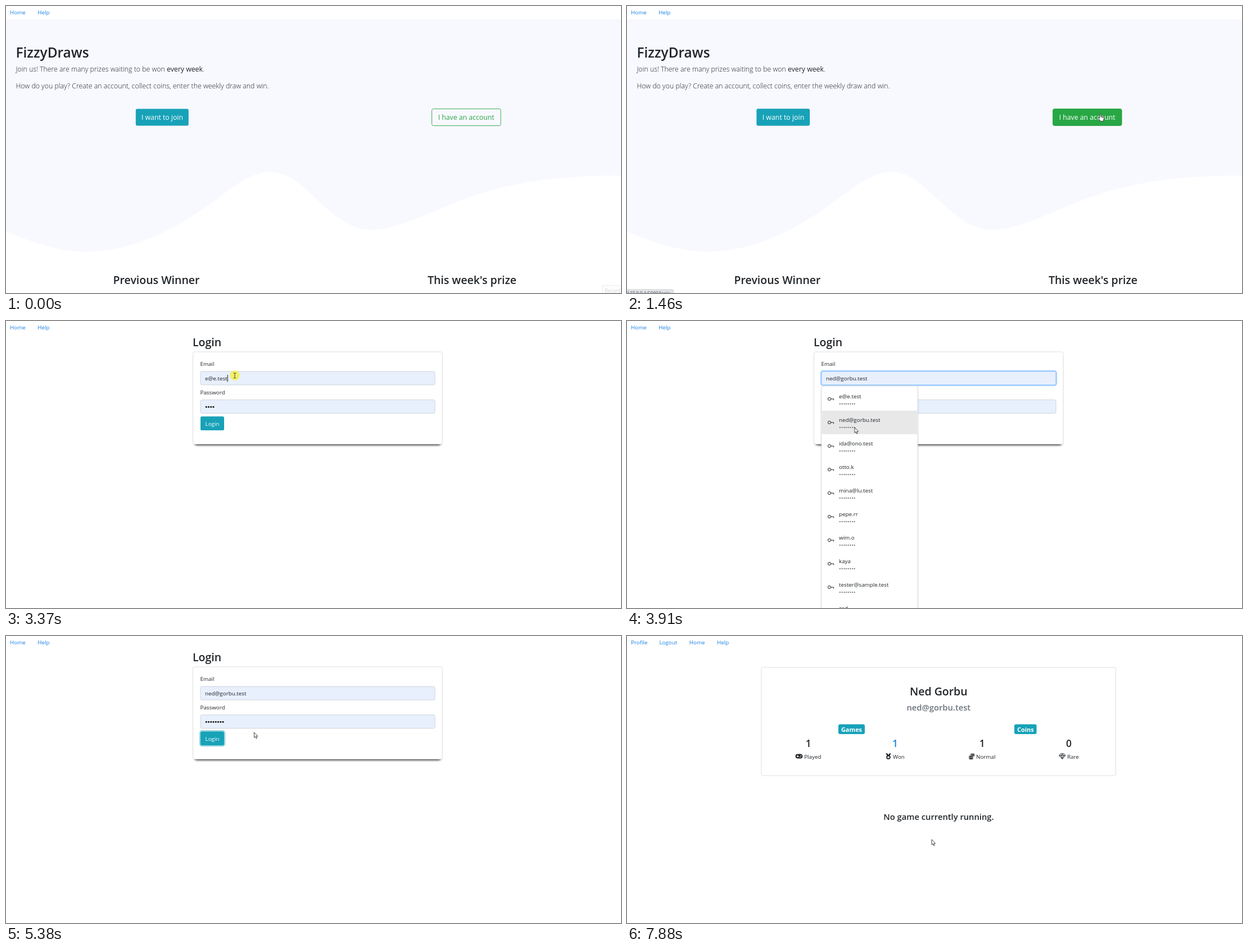
An HTML page for the animation above (8 s loop, 1094 px wide and 512 px high).

```html
<!DOCTYPE html>
<html lang="en">
<head>
<meta charset="utf-8">
<title>Weekly draw</title>
<style>
  html, body { margin: 0; width: 100%; height: 100%; overflow: hidden; background: #fff; }
  svg { display: block; width: 100vw; height: 100vh; }
  text { font-family: "Open Sans", "Noto Sans", sans-serif; font-size: 9.82px; fill: #212529; white-space: pre; }
  .h1 { font-size: 24.4px; font-weight: 600; }
  .h2 { font-size: 19.5px; font-weight: 600; }
  .h3 { font-size: 17.4px; font-weight: 600; }
  .h4 { font-size: 14.75px; font-weight: 600; }
  .lead { font-size: 12.3px; font-weight: 300; }
  .lead tspan { font-weight: 400; }
  .btn { font-size: 12.25px; }
  .badge { font-size: 10.9px; font-weight: 700; }
  .mid { text-anchor: middle; }
  .link { fill: #1a82e2; }
  .white { fill: #fff; }
  .muted { fill: #6c757d; }
  .box { fill: #fff; stroke: #dfdfdf; }
  .icon { fill: #212529; }
  .line { fill: none; stroke: #212529; stroke-width: 1; stroke-linejoin: round; }
</style>
</head>
<body>
<svg id="stage" viewBox="0 0 1094 512" preserveAspectRatio="none"></svg>
<script>
const LOOP = 8000, LOGIN_AT = 2500, PROFILE_AT = 5400;
const NAME = 'Ned Gorbu', EMAIL = 'ned@gorbu.test', OTHER = 'e@e.test';
const svg = document.getElementById('stage');

const text = (x, y, str, cls = '', id = '') =>
  `<text x="${x}" y="${y}" class="${cls}"${id && ` id="${id}"`}>${str}</text>`;
const rect = (x, y, w, h, r, attrs) =>
  `<rect x="${x}" y="${y}" width="${w}" height="${h}" rx="${r}" ${attrs}/>`;
const group = (id, ...parts) => `<g id="${id}">${parts.join('')}</g>`;

const JOIN = { x: 230.8, y: 183.5, w: 94, h: 29.9 };
const joinX = JOIN.x + JOIN.w / 2, joinY = JOIN.y + JOIN.h / 2;

const landing = group('landing',
  `<path fill="#f8f8ff" d="M0 24H1094V303C980 301 890 315 800 350C740 375 690 399 650 399
    C612 399 585 374 555 347C528 322 505 296 470 296C428 296 390 336 340 369
    C280 409 215 438 142 438C95 438 47 422 0 402Z"/>`,
  text(17.5, 92, 'FizzyDraws', 'h1'),
  text(17.5, 117, 'Join us! There are many prizes waiting to be won <tspan>every week</tspan>.', 'lead'),
  text(17.5, 147, 'How do you play? Create an account, collect coins, enter the weekly draw and win.', 'lead'),
  rect(0, 0, 0, 0, 3, 'id="joinShadow"'),
  group('join',
    rect(JOIN.x, JOIN.y, JOIN.w, JOIN.h, 3, 'fill="#17a2b8"'),
    text(joinX + .2, 203.2, 'I want to join', 'btn mid white')),
  rect(756, 182, 125.4, 32.6, 4, 'id="accountRing" fill="none" stroke="#28a745" stroke-width="2.6"'),
  rect(757.5, 183.5, 122.6, 30, 3, 'id="account" fill="#28a745" stroke="#28a745" stroke-width=".9"'),
  text(818.6, 203.2, 'I have an account', 'btn mid', 'accountText'),
  text(267.5, 495.5, 'Previous Winner', 'h2 mid'),
  text(829, 495.5, "This week's prize", 'h2 mid'),
  group('status',
    rect(-4, 505.5, 87, 20, 3, 'fill="#dee1e6" stroke="#cfd2d7" stroke-width=".6"'),
    `<text x="0" y="516" style="font-size:8.2px;fill:#555">127.0.0.1:5000/login</text>`),
  group('record',
    rect(1061, 498.5, 40, 20, 0, 'fill="#fdfdff" stroke="#ececec"'),
    `<text x="1065" y="511" style="font-size:8.6px;fill:#d4d4d4">Record</text>`));

const people = [OTHER, EMAIL, 'ida@ono.test', 'otto.k', 'mina@lu.test', 'pepe.rr', 'wim.o', 'kaya', 'tester@sample.test', 'zed'];
const menuRow = (name, i) => {
  const y = 118 + 42 * i;
  return `<circle cx="360" cy="${y + 21}" r="2.6" class="line"/><path class="line" d="M362.6 ${y + 21}h5v2.4"/>` +
    text(377, y + 20, name) + text(377, y + 33, '••••••••', 'muted');
};
const field = (id, y) =>
  rect(346, y, 417, 24, 2.7, `id="${id}" stroke-width="1"`);

const login = group('login',
  text(332, 45, 'Login', 'h2'),
  rect(336, 64, 437, 157, 3, 'fill="#000" style="filter:blur(2px)"'),
  rect(332.5, 55, 443.6, 164.5, 3, 'class="box"'),
  text(345.5, 80, 'Email'),
  text(345.5, 131, 'Password'),
  rect(344.9, 88.9, 419.2, 26.2, 4, 'id="emailRing" fill="none" stroke="#007bff" stroke-width="2.2"'),
  field('email', 90),
  field('pass', 140.7),
  text(354, 106, '', '', 'emailText'),
  '<path id="caret" stroke="#111" stroke-width="1"/>',
  '<g id="dots"></g>',
  rect(344.8, 169.1, 44.4, 27, 4, 'id="submitRing" fill="none" stroke="#3ab0c3" stroke-opacity=".5" stroke-width="2.2"'),
  rect(346, 170.3, 42, 24.8, 2.7, 'id="submit"'),
  text(367, 187, 'Login', 'mid white'),
  group('menu',
    rect(347, 119, 169, 420, 3, 'fill="#000" fill-opacity=".3" style="filter:blur(2px)"'),
    rect(346, 116, 171, 420, 3, 'class="box"'),
    rect(346.5, 160, 170, 42, 0, 'id="menuHover" fill="#e8e8e9"'),
    people.map(menuRow).join('')));

const stat = (x, value, labelX, label, cls = '') =>
  text(x, 198, value, 'h3 mid ' + cls) + text(labelX, 218.6, label);
const profile = group('profile',
  rect(239, 56, 630.5, 193, 3, 'class="box"'),
  text(554.3, 106, NAME, 'h2 mid'),
  text(554.3, 133.2, EMAIL, 'h4 mid muted'),
  rect(376, 157.5, 47, 17.5, 3, 'fill="#17a2b8"'), text(399.5, 170.6, 'Games', 'badge mid white'),
  rect(689, 157.5, 39.6, 17.5, 3, 'fill="#17a2b8"'), text(708.8, 170.6, 'Coins', 'badge mid white'),
  stat(322.6, 1, 315.2, 'Played'), stat(477, 1, 473, 'Won', 'link'),
  stat(631.6, 1, 621, 'Normal'), stat(786, 0, 783, 'Rare'),
  // gamepad
  rect(299.6, 210.6, 12.8, 8, 4, 'class="icon"'),
  '<path d="M301.6 214.6h4M303.6 212.6v4" stroke="#fff" stroke-width="1.1"/>',
  '<circle cx="308" cy="215.8" r=".9" fill="#fff"/><circle cx="309.7" cy="213.5" r=".9" fill="#fff"/>',
  // medal
  '<path class="icon" d="M460 209.4h3.4l1.6 2.8 1.6-2.8h3.4l-3 4.4h-4z"/>',
  '<circle cx="465" cy="216.3" r="2.8" fill="#fff" stroke="#212529" stroke-width="1.9"/>',
  // coins
  [[614.6, 211], [614.6, 213.2], [612, 214.4], [612, 216.6], [612, 218.8]].map(([x, y]) =>
    `<ellipse cx="${x}" cy="${y}" rx="4" ry="1.5" fill="#212529" stroke="#fff" stroke-width=".5"/>`).join(''),
  // gem
  '<path class="line" d="M771.4 210h5.8l2.6 3.4-5.5 6-5.5-6zM768.8 213.4h11M772.2 213.4l2.1 6 2.1-6-2.1-3.4z"/>',
  text(554.4, 328, 'No game currently running.', 'h4 mid'));

const cursor = group('cursor',
  '<circle id="click" r="8.7" fill="#f4ee4e" fill-opacity=".85"/>',
  `<path id="arrow" fill="#fff" stroke="#333" stroke-width=".9" stroke-linejoin="round"
    d="M0 0V9.4L2.1 7.6 3.5 11 5.1 10.3 3.7 7.1H6.5Z"/>`,
  `<path id="hand" fill="#fff" stroke="#333" stroke-width=".9" stroke-linejoin="round"
    d="M-1 .6Q0-.6 1 .6V5L5.6 6Q6.8 6.4 6.6 8L5.6 11.4V13.4H-.6V12L-4 8Q-4 6.4-2.6 6.8L-1 8.4ZM2.6 5.4V7.4M4.4 5.8V7.6"/>`,
  `<path id="beam" fill="none" stroke="#333" stroke-width=".9"
    d="M-2.4-4.4Q0-4.4 0-3V3.6Q0 5-2.4 5M2.4-4.4Q0-4.4 0-3M0 3.6Q0 5 2.4 5"/>`);

svg.innerHTML = rect(0, 0, 1094, 512, 0, 'fill="#fff"') + landing + login + profile +
  group('guestNav', text(7, 15.3, 'Home', 'link'), text(56.2, 15.3, 'Help', 'link')) +
  group('userNav', ['Profile', 'Logout', 'Home', 'Help']
    .map((s, i) => text([7, 57.4, 110.8, 160][i], 15.3, s, 'link')).join('')) + cursor;

const el = {};
svg.querySelectorAll('[id]').forEach(e => el[e.id] = e);

const clamp = v => Math.min(1, Math.max(0, v));
const ramp = (t, from, dur) => clamp((t - from) / dur);
const within = (t, a, b) => t >= a && t < b;
const set = (e, attrs) => { for (const k in attrs) e.setAttribute(k, attrs[k]); };
const show = (e, on) => set(e, { display: on ? 'inline' : 'none' });
const mix = (a, b, k) => `rgb(${a.map((v, i) => Math.round(v + (b[i] - v) * k))})`;

// The CSS "ease" timing curve, solved by bisection.
function ease(x) {
  let lo = 0, hi = 1;
  const bez = (s, a, b) => 3 * (1 - s) * (1 - s) * s * a + 3 * (1 - s) * s * s * b + s * s * s;
  for (let i = 0; i < 20; i++) {
    const s = (lo + hi) / 2;
    if (bez(s, .25, .25) < x) lo = s; else hi = s;
  }
  return bez(lo, .1, 1);
}

// Pointer path: time, x, y
const path = [
  [70, 1078, 499], [350, 1030, 425], [600, 950, 300], [820, 878, 212], [960, 842, 192],
  [1880, 842, 192], [2100, 839, 196.5], [2500, 839, 196.5], [2620, 735, 128], [2960, 735, 128],
  [3280, 407, 97], [3440, 407, 97], [3900, 405, 190], [4180, 405, 190], [4400, 440, 210],
  [4580, 473, 198], [4760, 440, 194], [4960, 368, 184], [5200, 368, 184], [5630, 560, 152],
  [6100, 560, 152], [6170, 557, 141], [6290, 500, 116], [6420, 400, 140], [6540, 306, 195],
  [6680, 380, 270], [6810, 530, 325], [6930, 637, 345], [7130, 638, 344.5], [7460, 638, 344.5],
  [7600, 660, 400], [7680, 655, 428], [7780, 600, 405], [7880, 542, 363]
];

function slope(i, axis) {
  const a = path[i - 1], p = path[i], b = path[i + 1];
  const still = q => !q || Math.hypot(q[1] - p[1], q[2] - p[2]) < 2;
  return still(a) || still(b) ? 0 : (b[axis] - a[axis]) / (b[0] - a[0]);
}

function pointer(t) {
  const last = path.length - 1;
  if (t >= path[last][0]) return path[last].slice(1);
  const i = Math.max(0, path.findIndex(p => p[0] > t) - 1);
  const a = path[i], b = path[i + 1], d = b[0] - a[0], u = clamp((t - a[0]) / d);
  return [1, 2].map(k => {
    const h = u * u * (3 - 2 * u);
    return a[k] + (b[k] - a[k]) * h +
      d * (slope(i, k) * u * (1 - u) ** 2 - slope(i + 1, k) * u * u * (1 - u));
  });
}

function drawLanding(t) {
  const phase = (t % 2000) / 1000;
  const k = phase < 1 ? ease(phase) : 1 - ease(phase - 1);
  const s = 1 + .035 * k, inset = 4 * k;
  set(el.join, { transform: `translate(${joinX} ${joinY}) scale(${s}) translate(${-joinX} ${-joinY})` });
  const w = JOIN.w * s, h = JOIN.h * s;
  set(el.joinShadow, {
    x: joinX - w / 2 + inset, y: joinY - h / 2 + inset + 5.3 * k,
    width: w - 2 * inset, height: h - 2 * inset, 'fill-opacity': .8 * k
  });
  el.joinShadow.style.filter = `blur(${2 * k}px)`;

  const hover = ease(ramp(t, 950, 150));
  set(el.account, { 'fill-opacity': hover });
  set(el.accountText, { style: `fill:${mix([40, 167, 69], [255, 255, 255], hover)}` });
  set(el.accountRing, { 'stroke-opacity': .5 * ease(ramp(t, 2100, 130)) });
  show(el.status, t >= 1150);
  set(el.record, { opacity: 1 - ramp(t, 70, 180) });
}

function drawLogin(t) {
  const filled = t >= 2760, chosen = t >= 3850;
  const focus = ease(ramp(t, 3375, 150)) * (1 - ease(ramp(t, 5000, 150)));
  const fill = filled ? '#e8f0fe' : '#fff';
  set(el.email, { fill, stroke: mix([206, 212, 218], [128, 189, 255], focus) });
  set(el.pass, { fill, stroke: '#ced4da' });
  set(el.emailRing, { 'stroke-opacity': .3 * focus });

  el.emailText.textContent = !filled ? '' : chosen ? EMAIL : OTHER;
  const end = 354.6 + el.emailText.getComputedTextLength();
  set(el.caret, { d: `M${end} 96V108.5` });
  show(el.caret, within(t, 3350, 5000) && (t - 3350) % 1060 < 530);

  const count = !filled ? 0 : chosen ? 8 : 4;
  el.dots.innerHTML = Array.from({ length: count }, (_, i) =>
    `<circle cx="${356.2 + 4.25 * i}" cy="153.3" r="1.5" fill="#111"/>`).join('');

  const hover = ease(ramp(t, 4900, 150)) * (1 - ease(ramp(t, 5250, 150)));
  set(el.submit, { fill: mix([23, 162, 184], [19, 132, 150], hover) });
  show(el.submitRing, t >= 5000);
  show(el.menu, within(t, 3440, 4180));
  show(el.menuHover, chosen);
}

function drawCursor(t) {
  const [x, y] = pointer(t);
  set(el.cursor, { transform: `translate(${x.toFixed(2)} ${y.toFixed(2)})` });
  show(el.cursor, t >= 70);
  const hand = within(t, 930, LOGIN_AT) || within(t, 4900, 5260);
  const beam = within(t, 3180, 3480);
  show(el.hand, hand);
  show(el.beam, beam);
  show(el.arrow, !hand && !beam);
  show(el.click, [2080, 3310, 4110, 4990].some(c => within(t, c, c + 110)));
}

function draw(t) {
  const onLanding = t < LOGIN_AT, onProfile = t >= PROFILE_AT, onLogin = !onLanding && !onProfile;
  show(el.landing, onLanding);
  show(el.login, onLogin);
  show(el.profile, onProfile);
  show(el.guestNav, !onProfile);
  show(el.userNav, onProfile);
  if (onLanding) drawLanding(t);
  if (onLogin) drawLogin(t);
  drawCursor(t);
}

function tick() {
  draw(performance.now() % LOOP);
  requestAnimationFrame(tick);
}
tick();
</script>
</body>
</html>
```
